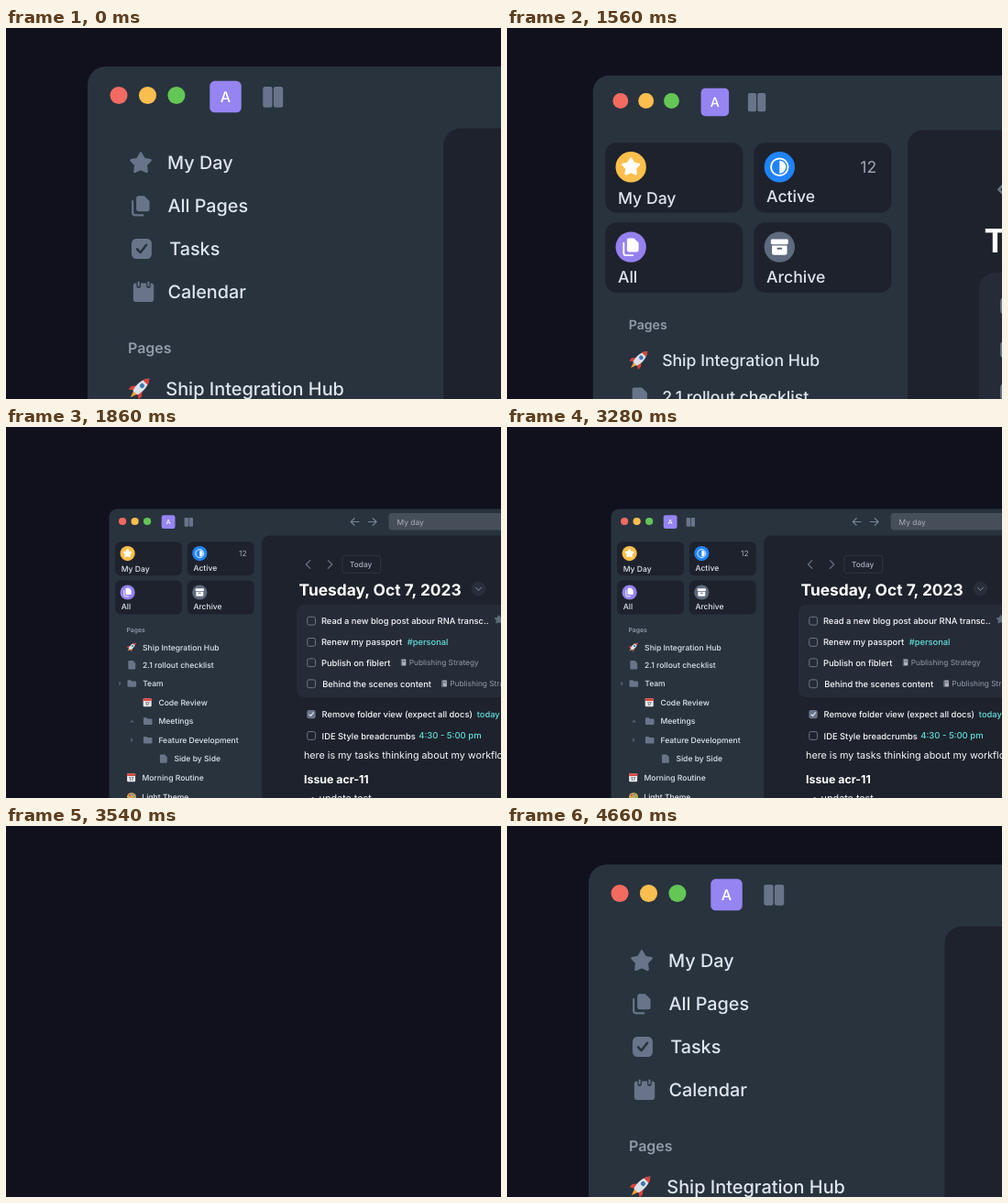
Animation of 540x405 px, one loop 4820 ms. Source, as an HTML page:

```html
<!DOCTYPE html>
<html lang="en">
<head>
<meta charset="utf-8">
<title>Sidebar tour</title>
<style>
  html, body { margin: 0; width: 100%; height: 100%; overflow: hidden; background: #11111d; }
  svg { display: block; width: 540px; height: 405px; }
  text { font-family: Inter, "Open Sans", sans-serif; font-optical-sizing: none; text-rendering: geometricPrecision; white-space: pre; }
</style>
</head>
<body>
<svg id="stage" viewBox="0 0 540 405" xmlns="http://www.w3.org/2000/svg"></svg>
<script>
const LOOP = 4820;
const ORIGIN = [112.5, 89.5];
const GRAY = '#69748a', LIGHT = '#dfe5ee', WHITE = '#f6f8fb', TEAL = '#60dfdb',
      MUTED = '#929baa', PANEL = '#1e222c', SIDE = '#28333e';

// ---- drawing helpers ----
const text = (x, y, str, size = 8.55, fill = LIGHT, weight = 500, anchor = 'start') =>
  `<text x="${x}" y="${y}" font-size="${size}" fill="${fill}" font-weight="${weight}" text-anchor="${anchor}">${str}</text>`;
const rect = (x, y, w, h, r, fill, more = '') =>
  `<rect x="${x}" y="${y}" width="${w}" height="${h}" rx="${r}" fill="${fill}" ${more}/>`;
const dot = (x, y, r, fill) => `<circle cx="${x}" cy="${y}" r="${r}" fill="${fill}"/>`;
const fillPath = (d, fill) => `<path d="${d}" fill="${fill}"/>`;
const line = (d, color, w = 1.2) =>
  `<path d="${d}" fill="none" stroke="${color}" stroke-width="${w}" stroke-linecap="round" stroke-linejoin="round"/>`;
const at = (x, y, body, more = '') => `<g transform="translate(${x} ${y}) ${more}">${body}</g>`;

// ---- icons, each centred on 0,0 ----
function star(r, fill) {
  const pts = Array.from({ length: 10 }, (_, i) => {
    const a = i * Math.PI / 5, k = i % 2 ? r * .54 : r;
    return (k * Math.sin(a)).toFixed(2) + ',' + (-k * Math.cos(a)).toFixed(2);
  });
  return `<polygon points="${pts.join(' ')}" fill="${fill}" stroke="${fill}" stroke-width="1.2" stroke-linejoin="round"/>`;
}
const copies = c =>
  fillPath('M-1 -4.7H1.6L4.1 -2.2V1.6a1 1 0 0 1 -1 1H-1a1.1 1.1 0 0 1 -1.1 -1V-3.6a1.1 1.1 0 0 1 1.1 -1.1z', c) +
  line('M-3.8 -2.2V3.2a1.2 1.2 0 0 0 1.2 1.2H1', c, .9);
const page = fillPath('M-2.9 -4.7H1.2L4 -1.9V3.7a1 1 0 0 1 -1 1H-2.9a1 1 0 0 1 -1 -1V-3.7a1 1 0 0 1 1 -1z', GRAY);
const folder = fillPath('M-3.9 -3.8H-1.2L0 -2.6H3.8a1 1 0 0 1 1 1V2.8a1 1 0 0 1 -1 1H-3.8a1 1 0 0 1 -1 -1V-2.8a1 1 0 0 1 .9 -1z', GRAY);
const task = rect(-4.7, -4.7, 9.4, 9.4, 2.2, GRAY) + line('M-2.1 .2L-.6 1.8L2.2 -1.8', SIDE, 1.1);
const month = rect(-4.8, -4, 9.6, 8.8, 1.3, GRAY) +
  [-2.3, 2.3].map(x => line(`M${x} -4.4V-2.6`, SIDE, 2) + line(`M${x} -4.4V-2.8`, GRAY, .9)).join('');
const half = `<circle r="4.5" fill="none" stroke="#fff" stroke-width=".9"/>` + fillPath('M0 -3.4A3.4 3.4 0 0 1 0 3.4z', '#fff');
const box = rect(-4.6, -4.2, 9.2, 2.8, .7, '#fff') +
  fillPath('M-4 -.8H4V3.2a1 1 0 0 1 -1 1H-3a1 1 0 0 1 -1 -1z', '#fff') + rect(-1.4, .3, 2.8, 1, .5, '#5e6a7e');
const rocket = at(0, 0,
  fillPath('M-1.1 3.2H1.1L0 6.4z', '#f9a13a') +
  fillPath('M-1.6 .2L-3.4 2.4V4.4L-1.3 3zM1.6 .2L3.4 2.4V4.4L1.3 3z', '#d8433c') +
  fillPath('M0 -6C2.3 -3.6 2.4 .6 1.4 3.4H-1.4C-2.4 .6 -2.3 -3.6 0 -6z', '#dce1e8') +
  fillPath('M0 -6C.9 -5.1 1.4 -4.3 1.6 -3.4H-1.6C-1.4 -4.3 -.9 -5.1 0 -6z', '#d8433c') +
  dot(0, -1.3, 1.1, '#3c78b4'), 'rotate(45)');
const date = rect(-4.5, -4.5, 9, 9, 1, '#e9eaee') + fillPath('M-4.5 -1.7V-3.5a1 1 0 0 1 1 -1H3.5a1 1 0 0 1 1 1V-1.7z', '#d9463f') +
  text(0, 3.4, '17', 5.2, '#33363d', 500, 'middle');
const palette = `<ellipse rx="5" ry="4.4" fill="#d3a553"/>` + dot(-2, -1.6, 1, '#d8433c') + dot(.8, -2.2, 1, '#3c9ad0') + dot(2.8, -.2, 1, '#58b158');
const note = rect(-2.5, -3.5, 5.4, 7, .6, '#aeb4bd') + rect(-2.5, -3.5, 1.2, 7, .4, '#59616d') + rect(-.4, -2, 2.2, 1.6, 0, '#626a76');
const caret = dir => fillPath(dir === 'up' ? 'M-2.4 1.2L0 -1.3L2.4 1.2z' : 'M-1.2 -2.4L1.3 0L-1.2 2.4z', '#566174');

// ---- window parts ----
const chrome = () =>
  rect(112.5, 89.5, 620, 460, 8.6, SIDE) +
  ['#f26a60', '#fabe4e', '#63c655'].map((c, i) => dot(127.1 + i * 13.5, 103, 4.1, c)).join('') +
  rect(169.7, 96.3, 14.8, 14.8, 2.3, '#9684f2') + text(177.1, 106.2, 'A', 6.9, '#fff', 500, 'middle') +
  rect(194.6, 98.9, 4.4, 9.8, 1, GRAY) + rect(199.6, 98.9, 4.4, 9.8, 1, GRAY) +
  line('M385 103.5H376.4M380.2 99.6L376.3 103.5L380.2 107.4', '#788395', 1.2) +
  line('M395.4 103.5H404M400.2 99.6L404.1 103.5L400.2 107.4', '#788395', 1.2) +
  rect(417.5, 94, 300, 18.6, 4, '#464e59') + text(426.6, 106.7, 'My day', 8.4, '#a9b1bc', 400);

const list = () => [
  [137.4, 134.9, star(4.7, GRAY), 149.9, 137.7, 'My Day'],
  [137.4, 154.8, copies(GRAY), 150, 157.9, 'All Pages'],
  [137.8, 174.9, task, 150.8, 178, 'Tasks'],
  [138.7, 195, month, 150, 198.2, 'Calendar']
].map(([x, y, icon, tx, ty, label]) => at(x, y, icon) + text(tx, ty, label, 8.5)).join('');

const cards = () => [
  [0, 0, '#fdbf4c', star(4.5, '#fff'), 'My Day', 157.5],
  [1, 0, '#2083fc', half, 'Active', 156.9],
  [0, 1, '#9580f0', copies('#fff'), 'All', 199.2],
  [1, 1, '#5e6a7e', box, 'Archive', 199.2]
].map(([col, row, color, icon, label, ty]) => {
  const x = 119.1 + col * 78.7, y = 125.2 + row * 42.4;
  return rect(x, y, 72.8, 37, 5.8, PANEL) + dot(x + 13.5, y + 12.9, 8.1, color) +
    at(x + 13.5, y + 12.9, icon) + text(x + 6.6, ty, label);
}).join('') + text(262.7, 141.1, '12', 8.5, '#a0a8b5', 400, 'end');

const tree = () => text(131.4, 224, 'Pages', 6.85, MUTED, 600) + [
  [137.1, 240, rocket, 'Ship Integration Hub', 149.1, 243.6],
  [137.2, 259.7, page, '2.1 rollout checklist', 149.1, 263.2],
  [137.3, 280, folder, 'Team', 149.2, 283.4, 124.5],
  [154.2, 300.7, date, 'Code Review', 166.4, 304],
  [154.7, 321.1, folder, 'Meetings', 166.4, 324.3, 137.4, 'up'],
  [154.7, 341.7, folder, 'Feature Development', 166.4, 345, 137.4],
  [171.8, 362.1, page, 'Side by Side', 183.4, 365.4],
  [136.6, 382.7, date, 'Morning Routine', 148.4, 386],
  [137, 403.6, palette, 'Light Theme', 148.3, 406.6]
].map(([x, y, icon, label, tx, ty, cx, dir]) =>
  at(x, y, icon) + text(tx, ty, label) + (cx ? at(cx, y, caret(dir)) : '')).join('');

const check = (y, done) => done
  ? rect(328.3, y - 4.7, 9.4, 9.4, 2.2, GRAY) + line(`M330.8 ${y + .2}L332.4 ${y + 1.8}L335.3 ${y - 1.8}`, '#e4e8ee', 1.1)
  : rect(328.7, y - 4.4, 8.8, 8.8, 2, 'none', 'stroke="#6c7787" stroke-width="1"');

const todo = (y, label, done, x = 343.9) => check(y, done) + text(x, y + 3.5, label, 9.35, WHITE);
const ref = (x, y) => at(x, y - .3, note) + text(x + 6.3, y + 3, 'Publishing Strategy', 8.3, MUTED, 400);

const journal = () =>
  rect(279.2, 118.5, 480, 420, 8, PANEL) +
  line('M331.8 145.6L327.4 150L331.8 154.4M351.4 145.6L355.8 150L351.4 154.4', '#667184', 1.3) +
  rect(366.9, 140.4, 41.8, 18.8, 2.5, 'none', 'stroke="#323944" stroke-width=".9"') +
  text(387.1, 152.6, 'Today', 8.35, '#a5aebb', 500, 'middle') +
  text(319.6, 183.5, 'Tuesday, Oct 7, 2023', 17.35, '#fff', 700) +
  dot(515.5, 176.6, 7.8, '#292f3a') + line('M512.6 175.4L515.5 178.2L518.4 175.4', '#8a93a1', 1) +
  rect(316.9, 194, 440, 101, 8.5, '#262c37') +
  todo(211.7, 'Read a new blog post abour RNA transc..') + at(537.6, 210.2, star(4.4, '#5f6a7a')) +
  todo(234.9, 'Renew my passport') + text(437.8, 238.4, '#personal', 9.3, TEAL) +
  todo(257.3, 'Publish on fiblert') + ref(433.4, 257.3) +
  todo(280.3, 'Behind the scenes content', false, 345.2) + ref(478, 280.3) +
  todo(313.6, 'Remove folder view (expect all docs)', true, 344.6) + text(513.8, 316.9, 'today', 9.3, TEAL) +
  todo(337, 'IDE Style breadcrumbs', false, 344.6) + text(450.2, 339.9, '4:30 - 5:00 pm', 9.5, TEAL) +
  text(325, 361.9, 'here is my tasks thinking about my workflow', 10.75, WHITE, 400) +
  text(325, 389.4, 'Issue acr-11', 12.35, '#fff', 700) +
  dot(334.6, 405.6, 1.3, WHITE) + text(341.6, 409.4, 'update test', 10.75, WHITE, 400);

const stage = document.getElementById('stage');
stage.innerHTML =
  `<rect width="540" height="405" fill="#11111d"/>
  <g id="win"><g transform="translate(${-ORIGIN[0]} ${-ORIGIN[1]})">
    ${chrome()}<g id="list">${list()}</g><g id="cards">${cards()}</g>${tree()}${journal()}
  </g></g>`;
const [win, listEl, cardsEl] = ['win', 'list', 'cards'].map(id => document.getElementById(id));

// ---- motion ----
const span = (t, from, to) => Math.min(1, Math.max(0, (t - from) / (to - from)));
const outQuad = k => 1 - (1 - k) ** 2;

// cubic-bezier(.65, 0, .35, 1)
function inOut(k) {
  let lo = 0, hi = 1;
  for (let i = 0; i < 24; i++) {
    const s = (lo + hi) / 2, u = 1 - s;
    if (1.95 * s * u * u + 1.05 * s * s * u + s ** 3 < k) lo = s; else hi = s;
  }
  return lo * lo * (3 - 2 * lo);
}

// window poses: left, top, scale
const NEAR = [89, 42, 2.33], FAR = [...ORIGIN, 1], GONE = [ORIGIN[0] + 540, ORIGIN[1], 1], BELOW = [135.5, 421, 1.57];
const mix = (a, b, k) => a.map((v, i) => v + (b[i] - v) * k);

function pose(t) {
  if (t < 3260) return mix(NEAR, FAR, inOut(span(t, 1384, 1860)));
  if (t < 4240) return mix(FAR, GONE, inOut(span(t, 3260, 3700)));
  return mix(BELOW, NEAR, outQuad(span(t, 4240, 4660)));
}

function draw(now) {
  const t = now % LOOP, [x, y, s] = pose(t);
  const swap = t < 4240 ? inOut(span(t, 280, 680)) : 0;
  win.setAttribute('transform', `translate(${x} ${y}) scale(${s})`);
  listEl.setAttribute('opacity', 1 - swap);
  cardsEl.setAttribute('opacity', swap);
}

const start = performance.now();
function tick() {
  draw(performance.now() - start);
  requestAnimationFrame(tick);
}
tick();
</script>
</body>
</html>
```
